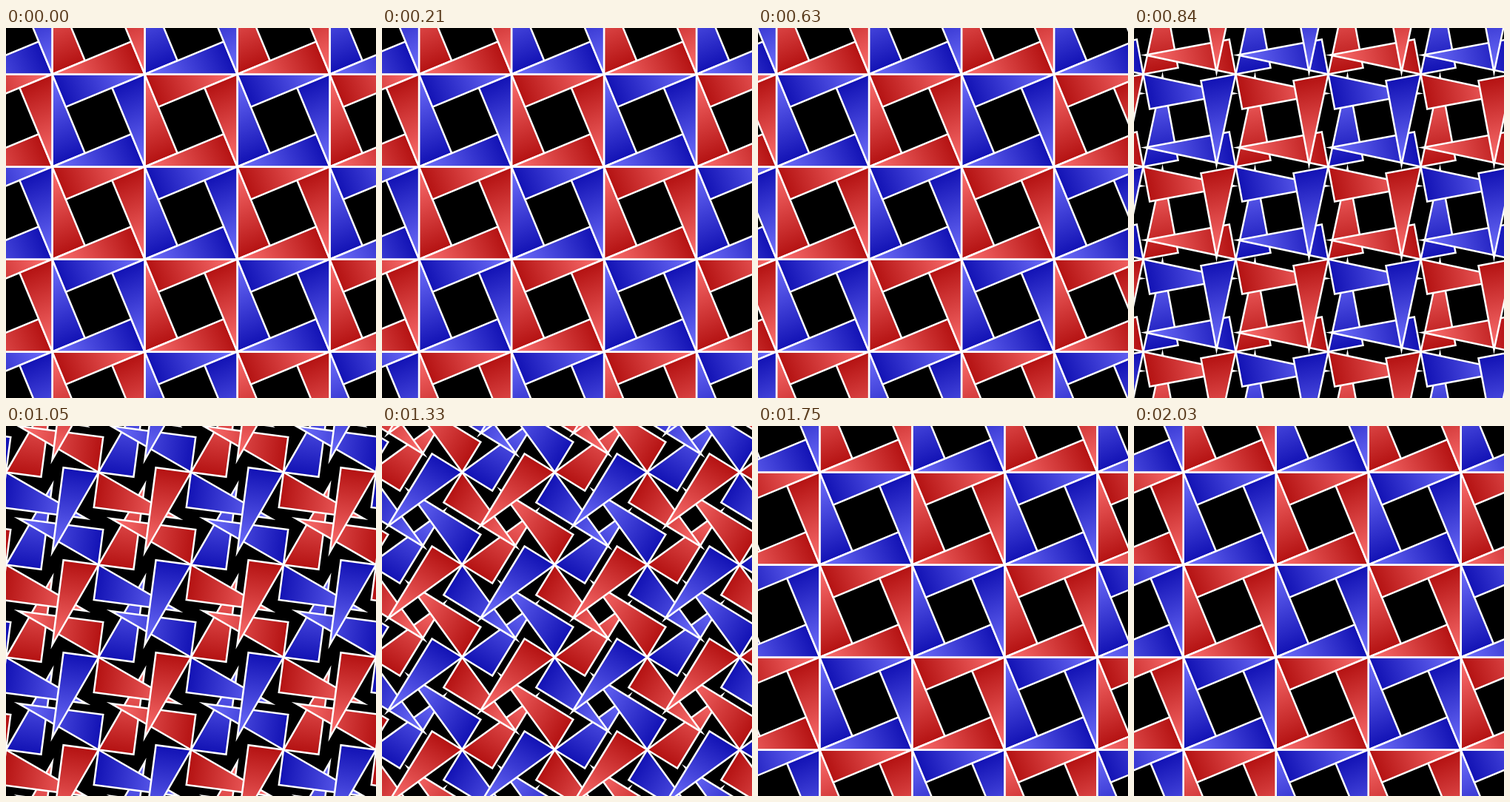
An HTML page with a canvas for the animation above (2.1 s loop, 500x500 px).

```html
<!DOCTYPE html>
<html lang="en">
<head>
<meta charset="utf-8">
<title>Pinwheel tiling</title>
<style>
html, body { margin: 0; width: 100%; height: 100%; overflow: hidden; background: #000; }
canvas { display: block; }
</style>
</head>
<body>
<canvas id="stage" width="500" height="500"></canvas>
<script>
const ctx = document.getElementById('stage').getContext('2d');
const CELL = 125, STEP_MS = 70, STEPS = 30;
const TURN_START = 10, TURN_END = 25;

// Right triangle: wide corner at the origin, hypotenuse along +x.
const wide = Math.PI * 3 / 8;
const leg = CELL * Math.cos(wide);
const cornerX = leg * Math.cos(wide), cornerY = leg * Math.sin(wide);

const blade = new Path2D();
blade.moveTo(0, 0);
blade.lineTo(CELL, 0);
blade.lineTo(cornerX, cornerY);
blade.closePath();

function gradient(dark, light) {
  const g = ctx.createLinearGradient(cornerX, cornerY, CELL, 0);
  g.addColorStop(0, dark);
  g.addColorStop(1, light);
  return g;
}
const fills = [gradient('#1212b4', '#7373ff'), gradient('#b41212', '#ff7373')];

function drawPinwheel(x, y, angle, parity) {
  for (let k = 0; k < 4; k++) {
    ctx.save();
    ctx.translate(x, y);
    ctx.rotate(angle + k * Math.PI / 2);
    ctx.fillStyle = fills[(parity + k) & 1];
    ctx.fill(blade);
    ctx.stroke(blade);
    ctx.restore();
  }
}

function draw() {
  const step = Math.floor(performance.now() / STEP_MS) % STEPS;
  const turn = (step - TURN_START) / (TURN_END - TURN_START);
  const angle = Math.min(1, Math.max(0, turn)) * Math.PI / 2;
  const shift = CELL * step / STEPS;

  ctx.fillStyle = '#000';
  ctx.fillRect(0, 0, 500, 500);
  ctx.strokeStyle = '#fff';
  ctx.lineWidth = 2.5;
  // Pinwheels further right and further up lie on top.
  for (let i = -1; i <= 5; i++) {
    for (let j = 5; j >= -1; j--) {
      drawPinwheel((i + 0.5) * CELL - shift, (j + 0.5) * CELL, angle, i + j);
    }
  }
  requestAnimationFrame(draw);
}
draw();
</script>
</body>
</html>
```
